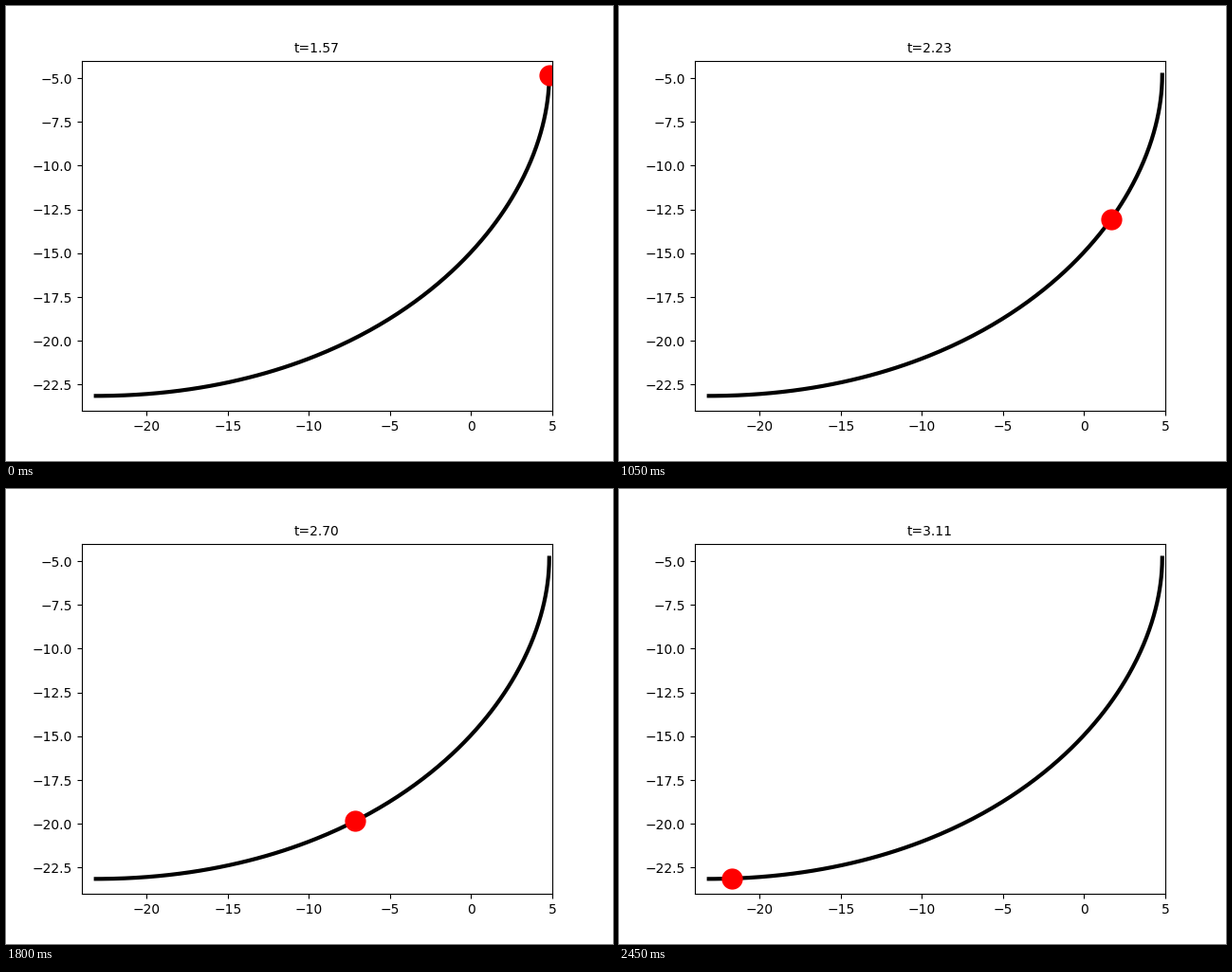
These frames come from a looping animation (640x480 px, 2.5 s). A matplotlib script:

```python
import numpy as np
import matplotlib.pyplot as plt
from matplotlib.animation import FuncAnimation

FRAMES = 50
INTERVAL = 50


def spiral(t):
    """Point on the exponential spiral at parameter t."""
    r = np.exp(t)
    return r * (np.cos(t) + np.sin(t)), r * (np.cos(t) - np.sin(t))


fig, ax = plt.subplots(figsize=(6.4, 4.8), dpi=100)
ax.set_xlim(-24, 5)
ax.set_ylim(-24, -4)

ax.plot(*spiral(np.linspace(np.pi / 2, np.pi, 200)), color="black", lw=3)
ball, = ax.plot([], [], "o", color="red", markersize=15)
title = ax.set_title("", fontsize=10)


def update(i):
    t = np.pi / 2 * (1 + i / FRAMES)
    x, y = spiral(t)
    ball.set_data([x], [y])
    title.set_text(f"t={t:.2f}")
    return ball, title


anim = FuncAnimation(fig, update, frames=FRAMES, interval=INTERVAL,
                     repeat=True, repeat_delay=0, blit=False)
plt.show()
```
